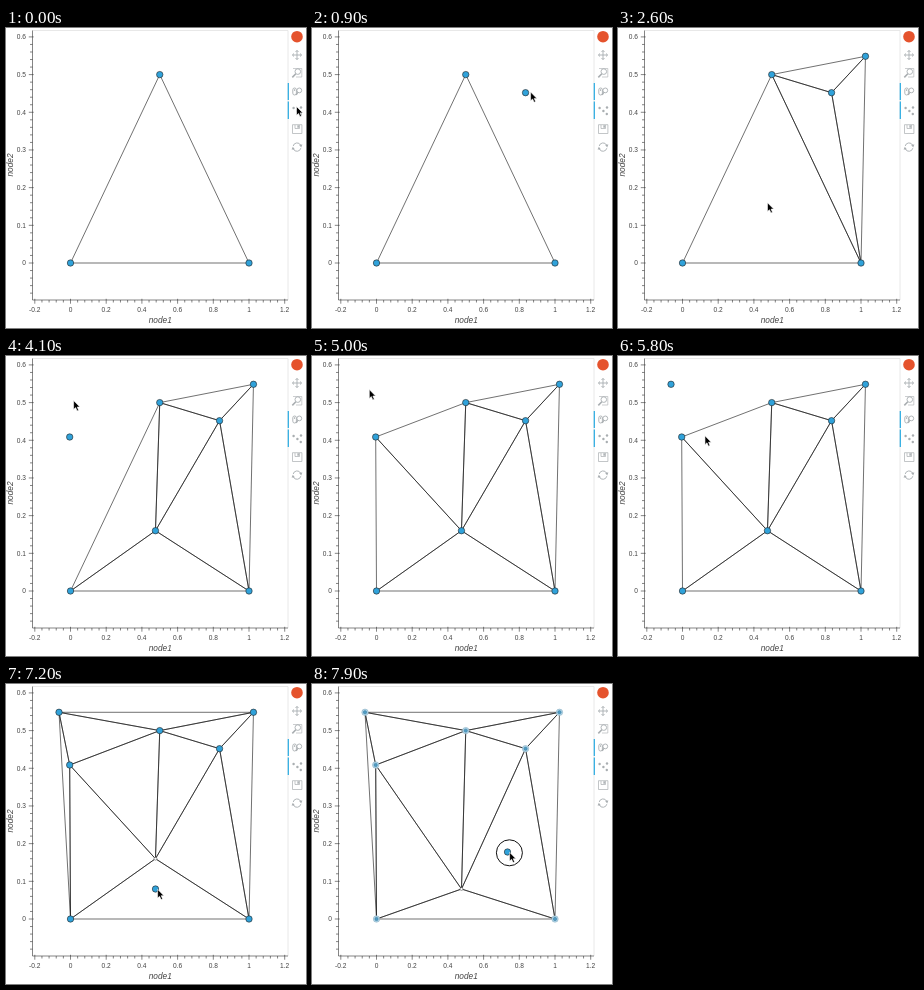
These frames come from a looping animation (300 px wide and 300 px high, 8000 ms). An HTML page:

```html
<!DOCTYPE html>
<html lang="en">
<head>
<meta charset="utf-8">
<title>Triangulation editor</title>
<style>
html, body { margin: 0; width: 100%; height: 100%; overflow: hidden; background: #fff; }
svg { display: block; width: 100vw; height: 100vh; }
text { font-family: "Liberation Sans", Arial, sans-serif; fill: #444; }
.tick { font-size: 6.6px; }
.title { font-size: 8.3px; font-style: italic; text-anchor: middle; }
.axis { fill: none; stroke: #333; stroke-width: .6; }
.edges { fill: none; stroke: #111; stroke-width: .6; stroke-linejoin: round; }
.node { fill: #30a2da; stroke: #222; stroke-width: .6; }
.node.faded { fill: #b5d9ed; stroke: #8fb0c2; }
.vertex { fill: #fff; stroke: #444; stroke-width: .5; }
.core { fill: #4f9cc4; stroke: #3f7f9f; stroke-width: .5; }
.icon { fill: none; stroke: #a9aeb1; stroke-width: .9; }
.solid { fill: #a9aeb1; }
</style>
</head>
<body>
<svg viewBox="0 0 300 300">
  <path d="M26.5 2.5H282V272" fill="none" stroke="#e3e3e3" stroke-width=".8"/>
  <g id="axes"></g>
  <g id="graph"></g>
  <g id="tools">
    <circle cx="291" cy="8.7" r="5.8" fill="#e5532d"/>
    <path d="M282.3 55V72M282.3 73.5V91" stroke="#26aae1" stroke-width="1.2"/>
    <g class="icon">
      <path d="M286.5 27H295.5M291 22.5V31.5"/>
      <path d="M288 25.5L286.4 27L288 28.5M294 25.5L295.6 27L294 28.5M289.5 24L291 22.4L292.5 24M289.5 30L291 31.6L292.5 30"/>
      <path d="M287 40.5H295.8V49H290" stroke-width=".6"/>
      <circle cx="291.8" cy="43.6" r="2.8"/>
      <path d="M289.8 45.7L286.3 49.4" stroke-width="1.6"/>
      <rect x="286.8" y="60" width="3.6" height="7" rx="1.8"/>
      <path d="M288.6 61.2V63"/>
      <circle cx="293.3" cy="62.4" r="2.4"/>
      <path d="M291.8 64.4L290.2 66.8" stroke-width="1.4"/>
      <path d="M286.5 96.7H295.9V105.5H286.5ZM289 97V100.5H293.5V97" stroke-width=".7"/>
      <path d="M287.2 118A4 4 0 0 1 294.6 117M294.8 120.2A4 4 0 0 1 287.4 121.2"/>
    </g>
    <g class="solid">
      <path d="M291.4 97.3H292.9V99.7H291.4ZM293 116.8L296.4 116.6L295.2 119.4ZM289 121.4L285.6 121.6L286.8 118.8Z"/>
      <circle cx="287.6" cy="80" r="1.2"/>
      <circle cx="291.4" cy="83" r="1.2"/>
      <circle cx="295" cy="79.5" r="1.2"/>
      <circle cx="294.8" cy="86" r="1.2"/>
    </g>
  </g>
  <circle id="ring" r="13" fill="none" stroke="#111" stroke-width="1"/>
  <path id="cursor" d="M0 0V8.8L2 7L3.5 10.3L5 9.6L3.6 6.4H6.3Z" fill="#000" stroke="#fff" stroke-width=".6"/>
</svg>
<script>
const LOOP = 8000, STEP = 100, LAG = 500, PRESS = 100;
const $ = id => document.getElementById(id);
const px = v => 64.5 + 178.5 * v;
const py = v => 235 - 376.8 * v;

function add(parent, tag, attrs, text = "") {
  const el = document.createElementNS("http://www.w3.org/2000/svg", tag);
  for (const k in attrs) el.setAttribute(k, attrs[k]);
  el.textContent = text;
  parent.appendChild(el);
  return el;
}

// Axes, five minor ticks per major one
const axes = $("axes");
const axisLine = d => add(axes, "path", { d, class: "axis" });
const label = v => String(+v.toFixed(1));

axisLine("M26.5 2.5V272H282");
for (let i = -5; i <= 30; i++) {
  const x = px(i * .04), major = i % 5 === 0;
  axisLine(`M${x} ${major ? 270.8 : 272}V${major ? 275.7 : 274.5}`);
  if (major) add(axes, "text", { x, y: 283.6, class: "tick", "text-anchor": "middle" }, label(i * .04));
}
for (let i = -4; i <= 30; i++) {
  const y = py(i * .02), major = i % 5 === 0;
  axisLine(`M${major ? 22.8 : 24} ${y}H${major ? 27.7 : 26.5}`);
  if (major) add(axes, "text", { x: 19.9, y: y + 2.3, class: "tick", "text-anchor": "end" }, label(i * .02));
}
add(axes, "text", { x: 154.3, y: 294.6, class: "title" }, "node1");
add(axes, "text", { transform: "translate(7.2 137) rotate(-90)", class: "title" }, "node2");

// Nodes in data units, with the time of the click that adds them
const node = (x, y, born = -LAG) => ({ x, y, born });
const A = node(0, 0), B = node(1, 0), C = node(.5, .5);
const D = node(.835, .452, 600), E = node(1.025, .5486, 1600), F = node(.476, .16, 3000);
const G = node(-.0045, .4087, 3700), H = node(-.0644, .5486, 5500);
const nodes = [A, B, C, D, E, F, G, H];
const drags = [{ from: 6200, to: 6800 }, { from: 7400, to: LOOP }];

// Places where the pointer rests or turns
const stop = (from, to, x, y) => ({ from, to, x, y });
const over = (from, to, n) => stop(from, to, px(n.x), py(n.y));
const stops = [
  stop(0, 100, 290.5, 78.5), over(400, 800, D), stop(900, 900, 218.6, 64),
  over(1400, 1700, E), over(2600, 3100, F), over(3500, 3800, G),
  stop(4100, 4100, 67.6, 44.6), stop(4600, 4700, 44, 29), stop(5000, 5000, 57.3, 33.6),
  over(5200, 5600, H), over(6100, 6200, F), stop(6570, 6800, 149.5, 205),
  stop(7200, 7400, 151.6, 205.3), stop(7900, LOOP, 197.6, 168.3)
];

const smooth = u => u * u * (3 - 2 * u);

function pointer(t) {
  const i = stops.findIndex(s => t <= s.to), b = stops[i];
  if (t >= b.from) return b;
  const a = stops[i - 1], k = smooth((t - a.to) / (b.from - a.to));
  return { x: a.x + (b.x - a.x) * k, y: a.y + (b.y - a.y) * k };
}

// Pixel place of a node after the given drags
function place(n, t, moves) {
  let x = px(n.x), y = py(n.y);
  if (n === F) for (const m of moves) {
    const a = pointer(m.from), b = pointer(Math.min(t, m.to));
    x += b.x - a.x;
    y += b.y - a.y;
  }
  return { x, y };
}

// Delaunay: keep triangles whose circumcircle, in data units, holds no other point
function triangulate(pts) {
  const flat = pts.map(p => ({ ...p, u: (p.x - 64.5) / 178.5, v: (235 - p.y) / 376.8 }));
  const empty = (a, b, c) => {
    const bu = b.u - a.u, bv = b.v - a.v, cu = c.u - a.u, cv = c.v - a.v;
    const d = 2 * (bu * cv - bv * cu);
    if (Math.abs(d) < 1e-6) return false;
    const bb = bu * bu + bv * bv, cc = cu * cu + cv * cv;
    const ou = (cv * bb - bv * cc) / d, ov = (bu * cc - cu * bb) / d;
    const r = Math.hypot(ou, ov);
    return flat.every(p => Math.hypot(p.u - a.u - ou, p.v - a.v - ov) > r - 1e-6);
  };
  let path = "";
  flat.forEach((a, i) => flat.slice(i + 1).forEach((b, j) => flat.slice(i + j + 2).forEach(c => {
    if (empty(a, b, c)) path += `M${a.x} ${a.y}L${b.x} ${b.y}L${c.x} ${c.y}Z`;
  })));
  return path;
}

const graph = $("graph");
const edges = add(graph, "path", { class: "edges" });
const vertex = add(graph, "circle", { r: 1.5, class: "vertex" });
const dots = nodes.map(n => ({
  n,
  disc: add(graph, "circle", { r: 3.2 }),
  core: add(graph, "circle", { r: 1.7, class: "core" })
}));

const show = (el, on) => el.setAttribute("visibility", on ? "visible" : "hidden");
function center(el, p) {
  el.setAttribute("cx", p.x);
  el.setAttribute("cy", p.y);
}

function draw(t) {
  // The mesh follows clicks and finished drags after a delay
  const settled = drags.filter(d => t >= d.to + LAG);
  const mesh = nodes.filter(n => t >= n.born + LAG);
  edges.setAttribute("d", triangulate(mesh.map(n => place(n, t, settled))));
  center(vertex, place(F, t, settled));
  show(vertex, mesh.includes(F));

  const begun = drags.filter(d => t >= d.from);
  const dragging = begun.some(d => t < d.to);
  for (const { n, disc, core } of dots) {
    const p = place(n, t, begun), faded = dragging && n !== F;
    center(disc, p);
    center(core, p);
    disc.setAttribute("class", faded ? "node faded" : "node");
    show(disc, t >= n.born);
    show(core, faded);
  }

  const { x, y } = pointer(t);
  const clicking = nodes.some(n => t >= n.born - PRESS && t < n.born);
  $("cursor").setAttribute("transform", `translate(${x} ${y})`);
  center($("ring"), { x: x - .2, y: y + .5 });
  show($("ring"), dragging || clicking);
}

const start = performance.now();
function tick() {
  const t = (performance.now() - start) % LOOP;
  draw(Math.floor(t / STEP) * STEP);
  requestAnimationFrame(tick);
}
draw(0);
requestAnimationFrame(tick);
</script>
</body>
</html>
```
